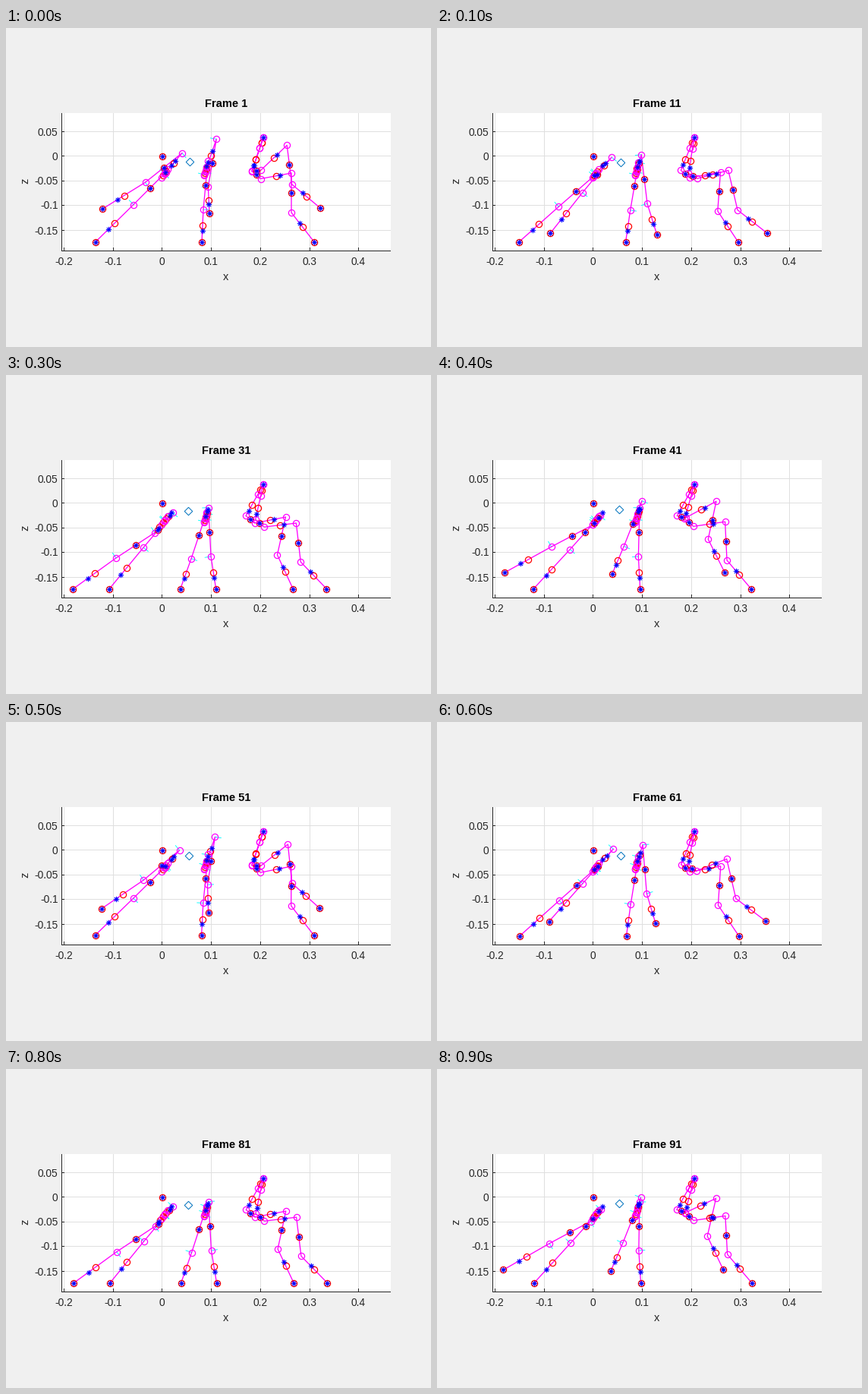
Animation of 560x420 px, one loop 1 s. Source, as a matplotlib script:

```python
import numpy as np
import matplotlib.pyplot as plt
from matplotlib.animation import FuncAnimation

W, H, DPI = 560, 420, 100
PX = 72 / DPI                  # points per pixel
STEP, GAIT = 10, 51            # counter step per picture, gait period
GROUND = 281.6
INK, GRID = "#262626", "#dfdfdf"
LEFT, RIGHT, TOP, BOTTOM = 73, 507, 112, 293
GAP = (np.nan, np.nan)
HEAD = np.array([339, 144.3])


def between(a, b, t=0.5):
    a, b = np.asarray(a, float), np.asarray(b, float)
    return a + (b - a) * t


class Leg:
    """Steps between touchdown and liftoff poses: foot, knee, hip (, base)."""

    def __init__(self, swing, touch, lift, rise, base=None, side=0):
        self.start, self.length = swing
        self.touch, self.lift, self.rise = np.array([touch, lift, rise], float)
        self.base, self.side = base, side
        self.front = base is None
        self.tibia_star = 0.37 if self.front else 0.66

    def pose(self, phase):
        t = (phase - self.start) % GAIT
        if t < self.length:
            s = t / self.length
            ease = np.sin(np.pi * s / 2) ** 3
            return (between(self.lift, self.touch, ease)
                    + self.rise * np.sin(np.pi * s) ** 2)
        return between(self.touch, self.lift,
                       (t - self.length) / (GAIT - self.length))

    def chain(self, phase):
        """Joints from the body out to the foot."""
        foot, knee, hip, *rest = self.pose(phase)
        if not self.front:
            return [self.base, hip, knee, foot]
        base = rest[0]
        x = base[0] - 11.5
        neck = np.array([x, 187.7 + 0.39 * (x - 322)])
        return [HEAD, between(HEAD, neck, 0.32), neck, base, hip, knee, foot]

    def stars(self, chain):
        base, hip, knee, foot = chain[-4:]
        points = [foot, between(knee, foot, self.tibia_star),
                  between(knee, hip), between(base, hip, 0.62)]
        if self.front:
            collar, neck = chain[1:3]
            points += [between(collar, neck, 0.76), between(neck, base)]
        return points


# Body segments carrying the rear and middle pairs of legs.
REAR = (204.5, 197), (217.5, 181)
MIDDLE = (261, 194), (266, 177)
FIRST, SECOND = (34, 17), (44, 20)   # swing start and length of each tripod

LEGS = [
    Leg(FIRST, [(118, GROUND), (168, 232.5), (211, 189.5)],
        [(84.5, GROUND), (142, 242), (194, 210)],
        [(0, -27), (6, -18), (11, -12)], between(*REAR, 0.32), -1),
    Leg(SECOND, [(151.5, GROUND), (191, 223), (227, 174.5)],
        [(123.5, GROUND), (173, 230.5), (213.5, 187)],
        [(0, -55), (10, -33), (21, -26)], between(*REAR, 0.35), 1),
    Leg(FIRST, [(258, GROUND), (260, 239), (266, 175)],
        [(226, GROUND), (242, 242), (264, 182)],
        [(0, -24), (2, -20), (7, -19)], between(*MIDDLE, 0.05), 1),
    Leg(SECOND, [(292, GROUND), (278, 239), (266.5, 174)],
        [(264, GROUND), (263.5, 239), (267, 175)],
        [(0, -47), (1, -38), (13, -36)], between(*MIDDLE, 0.3), -1),
    Leg(FIRST, [(406, GROUND), (376, 243), (376, 191), (335.5, 198.5)],
        [(374.5, GROUND), (355, 236), (367.5, 186.5), (326.5, 194.5)],
        [(0, -27), (-1, -26), (-1, -26), (0, -9)]),
    Leg(SECOND, [(437, GROUND), (399, 250), (387, 198), (344, 201.5)],
        [(410.5, GROUND), (379.5, 243), (378.5, 192.5), (337, 199)],
        [(0, -56), (-7, -48), (-12, -49), (-3, -15)]),
]


def axis_tick(joint, toward, side):
    dx, dy = toward - joint
    normal = np.array([dy, -dx]) / max(np.hypot(dx, dy), 1e-6)
    return [joint, joint + 8 * side * normal, GAP]


fig = plt.figure(figsize=(W / DPI, H / DPI), dpi=DPI, facecolor="#f0f0f0")
ax = fig.add_axes([0, 0, 1, 1])
ax.set(xlim=(0, W), ylim=(H, 0))
ax.axis("off")
ax.add_patch(plt.Rectangle((LEFT, TOP), RIGHT - LEFT, BOTTOM - TOP,
                           fc="white", ec="none", zorder=0))


def rule(xs, ys, color, z):
    ax.plot(xs, ys, color=color, lw=PX, zorder=z, solid_capstyle="butt",
            snap=False)


def label(x, y, text, size=14.67, **kw):
    kw = {"ha": "center", "va": "center", "color": INK, **kw}
    return ax.text(x, y, text, fontsize=size * PX,
                   fontfamily="Liberation Sans", **kw)


left, bottom = LEFT + 0.5, BOTTOM + 0.5
for i in range(-2, 5):
    x = round(205.3 + 64.75 * i) + 0.5
    rule([x, x], [TOP, BOTTOM], GRID, 1)
    rule([x, x], [BOTTOM, BOTTOM - 4], INK, 2)
    label(x - 0.5, 308.5, f"{i / 10:g}", 13.7)
for i in range(-3, 2):
    y = round(168.4 - 32.4 * i) + 0.5
    rule([LEFT, RIGHT], [y, y], GRID, 1)
    rule([LEFT, LEFT + 4], [y, y], INK, 2)
    label(68.5, y + 1, f"{i / 20:g}", 13.7, ha="right")
rule([LEFT, RIGHT], [bottom, bottom], INK, 2)
rule([left, left], [TOP, BOTTOM + 1], INK, 2)
label(290, 328, "x")
label(25, 201.5, "z", rotation=90)
title = label(290, 100.5, "", weight="bold", color="black")


def layer(z, color, **kw):
    return ax.plot([], [], color=color, zorder=z, snap=False, **kw)[0]


ring = dict(ls="none", marker="o", ms=8.2 * PX, mfc="none", mew=1.25 * PX)
axes_line = layer(3, "cyan", lw=0.9 * PX)
bones = layer(4, "magenta", lw=1.3 * PX)
reds = layer(5, "red", **ring)
joints = layer(6, "magenta", **ring)
stars = layer(7, "blue", ls="none", marker=(8, 2, 0), ms=7.2 * PX,
              mew=0.9 * PX)
center = layer(5, "#0072bd", ls="none", marker=(4, 0, 0), ms=10.5 * PX,
               mfc="none", mew=PX)


def draw(i):
    count = i * STEP
    phase = count % GAIT
    flip = 1 if count < 50 else -1
    origin = (206, 168.7)
    lines, ticks, rings = [], [], []
    red, star = [origin], [origin, HEAD, REAR[1], MIDDLE[1]]

    for body in (REAR, MIDDLE):
        rings += [between(*body, t) for t in (0, 1 / 3, 2 / 3)]
        red += [between(*body, t) for t in (1 / 6, 1 / 2)]

    for leg in LEGS:
        chain = leg.chain(phase)
        lines += chain + [GAP]
        rings += chain[:-1]
        red += [between(a, b) for a, b in zip(chain, chain[1:])] + [chain[-1]]
        star += leg.stars(chain)
        if leg.side:
            for joint, toward in zip(chain, chain[1:]):
                ticks += axis_tick(joint, toward, leg.side * flip)

    for artist, points in [(axes_line, ticks), (bones, lines), (reds, red),
                           (joints, rings), (stars, star)]:
        artist.set_data(*np.array(points, float).T)
    turn = 2 * np.pi * phase / GAIT
    center.set_data([240.7 + np.cos(turn - 0.6)], [177.2 - 1.6 * np.cos(turn)])
    title.set_text(f"Frame {count + 1}")
    return axes_line, bones, reds, joints, stars, center, title


anim = FuncAnimation(fig, draw, frames=10, interval=100, repeat=True,
                     repeat_delay=0, blit=False)
plt.show()
```
